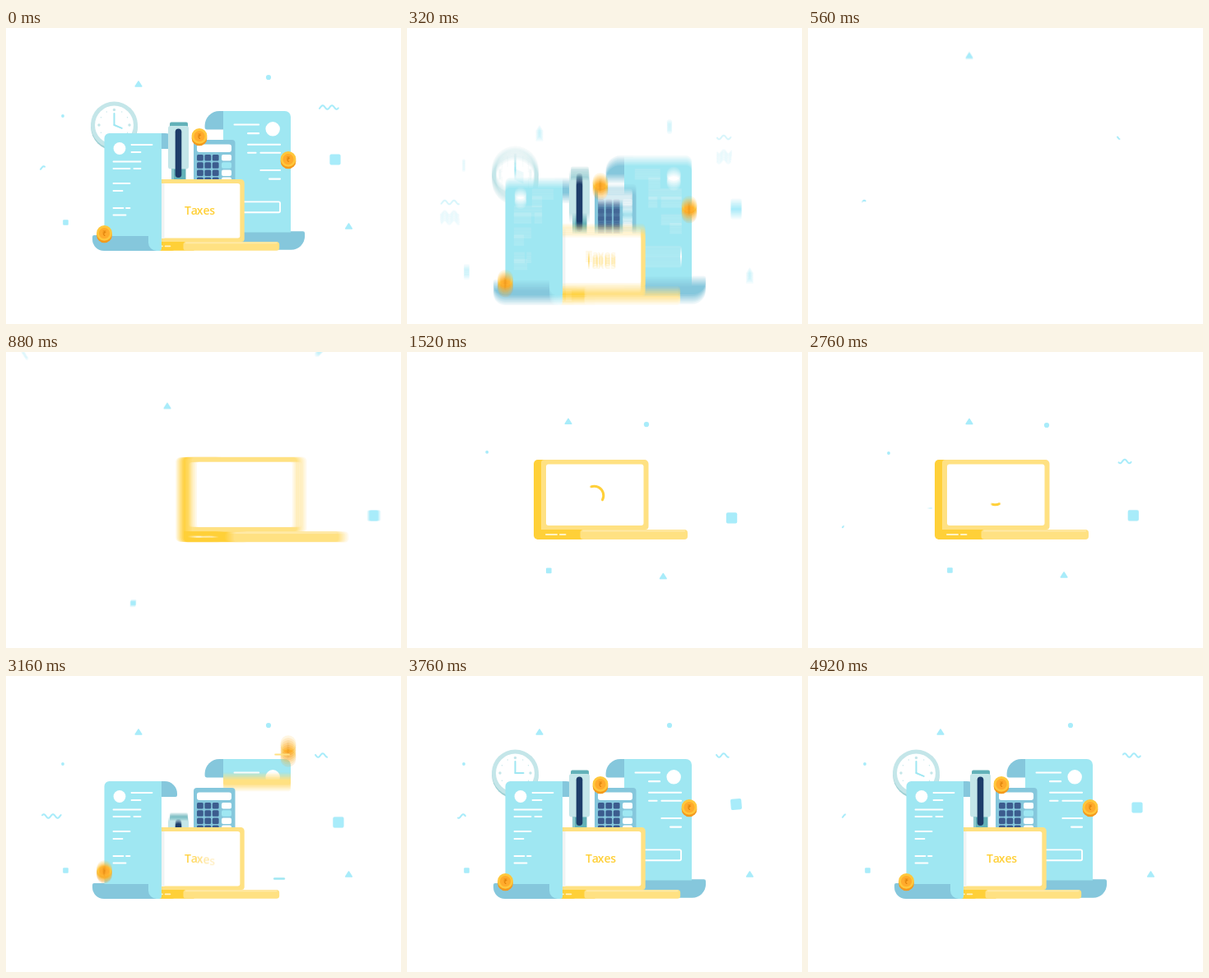
Animation of 480 by 360 pixels, one loop 4.96 s. Source, as an HTML page with a canvas:

```html
<!DOCTYPE html>
<html lang="en">
<head>
<meta charset="utf-8">
<title>Taxes</title>
<style>
html, body { margin: 0; width: 100%; height: 100%; overflow: hidden; background: #fff; }
canvas { display: block; width: 480px; height: 360px; }
</style>
</head>
<body>
<canvas id="stage" width="480" height="360"></canvas>
<script>
const LOOP = 4960, STEP = 40, SHUTTER = 18, SAMPLES = 7;
const SKY = '#a8ecfa', PAPER = '#9fe7f2', FOLD = '#85c7dc', GOLD = '#ffd038', CREAM = '#ffe182';
const PALE = '#c4e6e9', TEAL = '#62b1b8', NAVY = '#1d3c69';
const view = document.getElementById('stage').getContext('2d');
const layer = document.createElement('canvas');
layer.width = 480;
layer.height = 360;
const c = layer.getContext('2d');

const clamp = v => Math.max(0, Math.min(1, v));
const lerp = (a, b, u) => a + (b - a) * u;
const span = (t, a, b) => clamp((t - a) / (b - a));
const inOut = u => u * u * (3 - 2 * u);
const out = u => 1 - (1 - u) ** 3;
const backOut = u => 1 + 2.2 * (u - 1) ** 3 + 1.2 * (u - 1) ** 2;

// Rows of [time, ...values], joined by straight motion
function keys(t, rows) {
  const i = rows.findIndex(row => row[0] >= t);
  if (i < 0) return rows[rows.length - 1].slice(1);
  if (i === 0) return rows[0].slice(1);
  const u = span(t, rows[i - 1][0], rows[i][0]);
  return rows[i].slice(1).map((v, k) => lerp(rows[i - 1][k + 1], v, u));
}

function box(x1, y1, x2, y2, color, radius = 0) {
  c.fillStyle = color;
  c.beginPath();
  c.roundRect(x1, y1, x2 - x1, y2 - y1, radius);
  c.fill();
}
function disc(x, y, r, color) {
  c.fillStyle = color;
  c.beginPath();
  c.arc(x, y, r, 0, 7);
  c.fill();
}
function line(x1, y1, x2, y2, color, width = 2) {
  c.strokeStyle = color;
  c.lineWidth = width;
  c.lineCap = 'round';
  c.beginPath();
  c.moveTo(x1, y1);
  c.lineTo(x2, y2);
  c.stroke();
}
function group(draw, x = 0, y = 0, sx = 1, sy = sx) {
  c.save();
  c.translate(x, y);
  c.scale(sx, sy);
  draw();
  c.restore();
}

// Each particle: shape, resting place, fly-in offset, place in the full scene
const shapes = {
  triangle() {
    c.fillStyle = c.strokeStyle = SKY;
    c.lineWidth = 1.5;
    c.lineJoin = 'round';
    c.beginPath();
    c.moveTo(0, -3);
    c.lineTo(3.8, 3);
    c.lineTo(-3.8, 3);
    c.closePath();
    c.fill();
    c.stroke();
  },
  square: () => box(-3.3, -3.3, 3.3, 3.3, SKY, 1),
  block: () => box(-6.6, -6.6, 6.6, 6.6, SKY, 2),
  circle: () => disc(0, 0, 3.1, SKY),
  dot: () => disc(0, 0, 1.9, SKY)
};
const particles = [
  ['triangle', 196, 84.5, 0, -19, 161, 68],
  ['triangle', 311, 271, 30, 150, 416.5, 241],
  ['square', 172.5, 265.5, -18, 40, 72.5, 236.5],
  ['block', 394, 202, 53, -3, 400, 160],
  ['circle', 290, 89, 91, -89, 319, 60],
  ['dot', 98, 123, -75, -119, 69, 107]
];
const leftWave = [[0, 42, 47], [320, 41, 63], [600, 71, 71], [1720, 42, 42], [2400, 52, 67],
  [2700, 71, 71], [2740, 42, 42], [3160, 44, 67], [3760, 62, 71], [3960, 71, 71],
  [4000, 42, 42], [4840, 42, 42], [4960, 42, 47]];
const rightWave = [[0, 381, 404], [320, 377, 394], [600, 376, 376], [1720, 404, 404],
  [2400, 379, 395], [3160, 376, 390], [3760, 376, 391], [4040, 376, 376], [4080, 404, 404],
  [4440, 404, 404], [4920, 383, 404], [4960, 381, 404]];

function wave(t, rows, y) {
  const [a, b] = keys(t, rows);
  if (b - a < 0.5) return;
  c.strokeStyle = SKY;
  c.lineWidth = 2;
  c.lineCap = 'round';
  c.beginPath();
  for (let x = a; x <= b; x += 0.5) c.lineTo(x, y - 2.3 * Math.sin((x - rows[0][1]) * 0.56 - 0.6));
  c.stroke();
}

function drawParticles(t, final) {
  const move = final ? 1 : inOut(span(t, 2760, 3130));
  const far = final ? 0 : Math.max(0, (1700 - t) / 820) ** 3;
  for (const [name, x, y, dx, dy, fx, fy] of particles) {
    let px = lerp(x + dx * far, fx, move), py = lerp(y + dy * far, fy, move), turn = 0;
    if (name === 'block' && t > 2700) {
      [px, py, turn] = keys(t, [[2700, 394, 202, 0], [3160, 404, 178, 0], [3560, 400, 155, -0.1],
        [3760, 400, 156, -0.08], [4300, 400, 160, 0]]);
    }
    group(() => { c.rotate(turn); shapes[name](); }, px, py);
  }
  wave(t, leftWave, lerp(212, 170.5, move));
  wave(t, rightWave, lerp(133, 96.5, move));
}

function foldedEdge(p) {
  if (p > 0) box(60, 0, 88.5, 19, FOLD, [0, 15, 2, 0]);
}
function page(p, roll, extra) {
  if (p <= 0) return;
  const h = lerp(0, 125, p);
  if (p < 1) box(0, h - 2, 69.5, h + 12, CREAM, [0, 0, 2, 2]);
  else box(lerp(40, -14.5, roll), 124, 64, 143, FOLD, [2, 0, 0, 14]);
  box(0, 0, 69.5, h, PAPER, [6, 0, 0, 0]);
  if (p === 1) box(53.5, 115, 69.5, 143, PAPER, [0, 0, 3, 10]);
  c.save();
  c.beginPath();
  c.rect(0, 0, 70, h);
  c.clip();
  disc(18.5, 18.5, 7.4, '#fff');
  const rows = [[14, 33, 58], [23, 33, 44], [34.5, 11, 44], [43, 11, 31], [43, 36, 44],
    [61, 11, 31], [70, 11, 22]];
  for (const [y, a, b] of rows) line(a, y, b, y, '#fff', 1.8);
  extra();
  c.restore();
}
function receiptLines() {
  line(11, 91, 23, 91, '#fff', 1.8);
  line(26.5, 91, 31, 91, '#fff', 1.8);
  line(11, 99.5, 26, 99.5, '#fff', 1.8);
}
function totalBox() {
  c.strokeStyle = '#fff';
  c.lineWidth = 1.6;
  c.beginPath();
  c.roundRect(11, 93.5, 54, 11, 1.5);
  c.stroke();
}

function clock(t) {
  const s = backOut(span(t, 3240, 3560));
  if (t < 3240) return;
  group(() => {
    disc(0, 2.5, 28.3, '#9ed0d4');
    disc(0, 0, 28.5, PALE);
    disc(0, 0, 23.5, '#fff');
    for (let i = 0; i < 12; i++) {
      const a = i * Math.PI / 6;
      disc(18.5 * Math.cos(a), 18.5 * Math.sin(a), i % 3 ? 0.7 : 1.7, PALE);
    }
    const a = lerp(-0.1, 0.4, span(t, 3500, 4900));
    line(0, 0, 0, -14, PAPER, 2);
    line(0, 0, 10 * Math.cos(a), 10 * Math.sin(a), PAPER, 2);
  }, 131.5, 118, s);
}

function calculator(t) {
  if (t < 2860) return;
  group(() => {
    box(228, 136, 278.5, 200, FOLD, 4);
    box(232, 141.5, 274, 151, '#fff', 3);
    for (let r = 0; r < 4; r++) {
      const y = 154 + r * 9.2;
      for (let k = 0; k < 3; k++) box(232 + k * 9.4, y, 239.8 + k * 9.4, y + 7.6, '#3c5c8e', 1.5);
      box(262, y, 274, y + 7.6, r === 1 ? PAPER : '#fff', 2);
    }
  }, 0, 62 * (1 - out(span(t, 2860, 3160))));
}

function pen(t) {
  if (t < 3080) return;
  group(() => {
    box(201, 168, 218.5, 190, TEAL);
    box(201, 172, 204, 190, '#8dc9ce');
    box(199, 114.5, 221, 122, TEAL, 2);
    box(197, 119, 222, 171.5, PALE, 3);
    box(205.7, 122.5, 213.3, 182, NAVY, 3.8);
  }, 0, 76 * (1 - inOut(span(t, 3040, 3380))));
}

function coin(x, y, start, end, t) {
  const u = span(t, start, end);
  if (u <= 0) return;
  group(() => {
    disc(0, 1.6, 9.4, '#f39a1d');
    disc(0, -0.9, 9.4, '#ffc73c');
    disc(0, -0.6, 6.6, '#ffab2c');
    c.fillStyle = '#e2850e';
    c.font = 'bold 9px "Noto Sans", "DejaVu Sans", sans-serif';
    c.textAlign = 'center';
    c.fillText('₹', 0, 2.4);
  }, x, y + 0.3 - (y + 15) * (1 - out(u)));
}

function spinner(t) {
  if (t < 1300 || t > 2800) return;
  const grow = span(t, 1300, 1500) * span(2800 - t, 0, 160);
  const start = -Math.PI / 2 + (t - 2400) * 0.0075;
  c.strokeStyle = GOLD;
  c.lineWidth = 3;
  c.lineCap = 'round';
  c.beginPath();
  c.arc(227.5, 174.5, 11.3, start, start + grow * (2 + Math.sin((t - 2400) / 250)));
  c.stroke();
}

function laptop(t, final) {
  if (!final && t < 600) return;
  const far = final ? 0 : Math.max(0, (1200 - t) / 320) ** 3;
  const move = final ? 1 : inOut(span(t, 2800, 3080));
  const s = lerp(1 + 0.065 * far, 0.894, move);
  group(() => {
    box(154, 131, 200, 228, GOLD, 5);
    box(163, 131, 293.5, 216, CREAM, [4, 5, 4, 0]);
    box(169, 136.5, 287.5, 211, '#fff', 3);
    box(158, 216, 225, 228, GOLD);
    box(210.5, 216, 341, 228, CREAM, 4);
    line(214, 217.5, 337, 217.5, '#ffe9a6', 2.2);
    line(169, 222, 182, 222, '#fff3c4');
    line(186, 222, 192.5, 222, '#fff3c4');
    if (!final) spinner(t);
  }, lerp(47 * far, 27.3, move), lerp(-11.7 * far, 66.9, move), s);
}

function label(t, final) {
  c.font = '600 14px "Open Sans", "Noto Sans", sans-serif';
  c.textAlign = 'left';
  c.fillStyle = GOLD;
  const word = 'Taxes', left = 235.5 - c.measureText(word).width / 2;
  [...word].forEach((letter, i) => {
    const u = final ? 1 : span(t, 2960 + 35 * i, 3180 + 35 * i);
    c.globalAlpha = u;
    c.fillText(letter, left + c.measureText(word.slice(0, i)).width, 227 + 8 * (1 - out(u)));
  });
  c.globalAlpha = 1;
}

// Speed lines: [x1, x2, y, width, color, start, duration]
const dashes = [
  [70, 140, 166, 2, SKY, 1760, 320], [330, 385, 158, 3, SKY, 1860, 320],
  [112, 158, 156.5, 3, SKY, 2250, 300], [125, 155, 147, 1, SKY, 2250, 300],
  [125, 155, 149.5, 1, GOLD, 2250, 300], [311, 340, 200, 3, SKY, 2250, 300],
  [341, 356, 188.5, 2.5, SKY, 2350, 300], [90, 150, 190, 2, SKY, 2480, 280],
  [326, 338, 246.5, 2.4, PAPER, 3020, 280], [327, 344, 95.5, 2, CREAM, 3020, 280]
];
function speedLines(t) {
  for (const [a, b, y, width, color, start, time] of dashes) {
    const u = (t - start) / time * 2;
    if (u > 0 && u < 2) line(lerp(a, b, clamp(u - 1)), y, lerp(a, b, clamp(u)), y, color, width);
  }
}

function paperwork(t, final) {
  const left = out(span(t, 2820, 3120)), right = inOut(span(t, 3080, 3420));
  const onLeft = draw => group(draw, 119.5, 128);
  clock(t);
  onLeft(() => foldedEdge(left));
  group(() => {
    foldedEdge(right);
    page(right, out(span(t, 3400, 3560)), totalBox);
  }, 346, 101, -1.18, 1.18);
  calculator(t);
  pen(t);
  laptop(final ? LOOP : t, final);
  if (left > 0) {
    if (left > 0.9) box(189, 189, 192.5, 256, '#f1f3f3');
    onLeft(() => page(left, out(span(t, 3080, 3160)), receiptLines));
  }
  label(t, final);
  coin(119.5, 250, 2980, 3260, t);
  coin(343, 160, 3080, 3380, t);
  coin(235, 132, 3200, 3500, t);
}

function scene(t) {
  c.fillStyle = '#fff';
  c.fillRect(0, 0, 480, 360);
  if (t < 600) {
    group(() => {
      paperwork(LOOP, true);
      drawParticles(t, true);
    }, 0, 384 * Math.max(0, (t - 40) / 520) ** 3);
  }
  if (t > 320) {
    drawParticles(t, false);
    if (t >= 600) paperwork(t, false);
    speedLines(t);
  }
}

// Averages a few moments around t for motion blur
function render(t) {
  for (let i = 0; i < SAMPLES; i++) {
    const shift = (i / (SAMPLES - 1) - 0.5) * SHUTTER;
    scene(Math.max(0, Math.min(LOOP - 1, t + shift)));
    view.globalAlpha = 1 / (i + 1);
    view.drawImage(layer, 0, 0);
  }
}

let shown = -1;
const begin = performance.now();
function tick() {
  const t = Math.floor((performance.now() - begin) % LOOP / STEP) * STEP;
  if (t !== shown) render(shown = t);
  requestAnimationFrame(tick);
}
tick();
</script>
</body>
</html>
```
